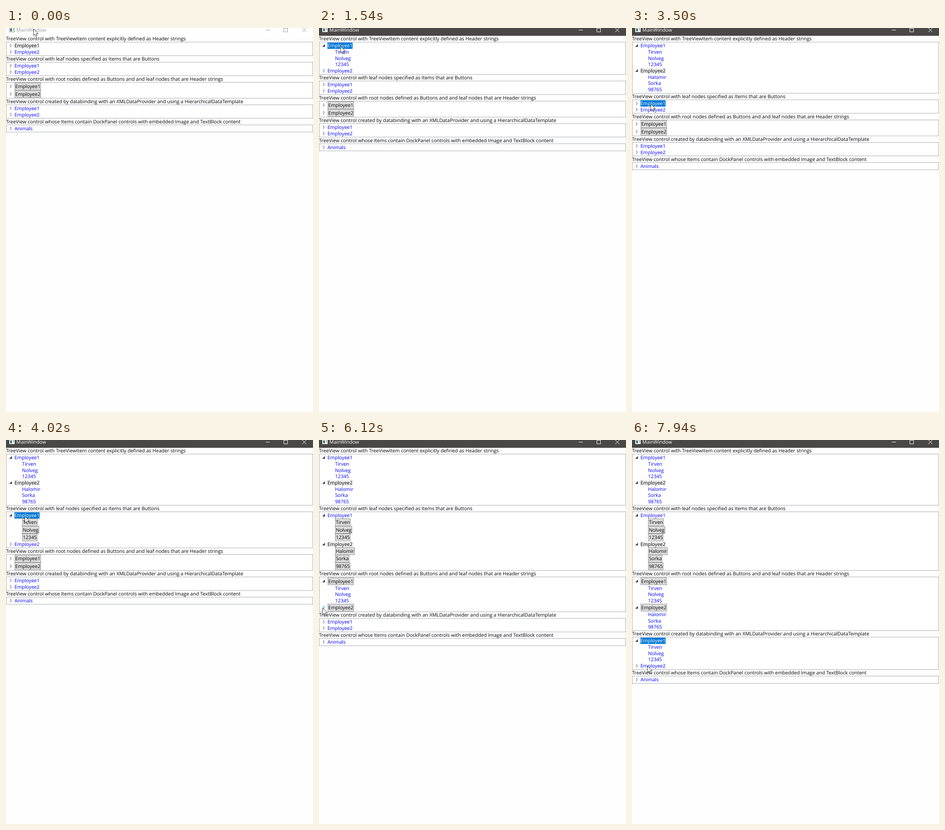
These frames come from a looping animation (669x837 px, 8000 ms). An HTML page:

```html
<!DOCTYPE html>
<html lang="en">
<head>
<meta charset="utf-8">
<title>Tree views</title>
<style>
  html, body { margin: 0; width: 100%; height: 100%; overflow: hidden; background: #fefefe; }
  svg { display: block; width: 669px; height: 837px; }
  text { font: 10.63px "Open Sans", "Noto Sans", sans-serif; white-space: pre; text-rendering: geometricPrecision; }
</style>
</head>
<body>
<svg id="stage" viewBox="0 0 669 837">
  <g id="windowLayer"></g>
  <path id="pointer" d="M0 0V14.6L3.4 11.5 5.7 16.7 7.9 15.7 5.7 10.6H10.3Z" fill="#fff" stroke="#222" stroke-width=".9"/>
</svg>
<script>
const LOOP = 8000, TICK = 143, WAKE = 80, DEPART = 360;
const TOP = 16.8, ROW = 13.67, LINE = .68;
const PAD = 2 * LINE, BUTTON_ROW = ROW + 4 * LINE;
const ROOT_X = 18.6, LEAF_X = 35;
const BLUE = '#0000ff', BLACK = '#000';

const employees = [
  { name: 'Employee1', leaves: ['Tirven', 'Nolveg', '12345'] },
  { name: 'Employee2', leaves: ['Halomir', 'Sorka', '98765'] }
];

const trees = [
  { title: 'TreeView control with TreeViewItem content explicitly defined as Header strings', roots: employees },
  { title: 'TreeView control with leaf nodes specified as Items that are Buttons', roots: employees, leafButtons: true },
  { title: 'TreeView control with root nodes defined as Buttons and and leaf nodes that are Header strings',
    roots: employees, rootButtons: true },
  { title: 'TreeView control created by databinding with an XMLDataProvider and using a HierarchicalDataTemplate',
    roots: employees },
  { title: 'TreeView control whose Items contain DockPanel controls with embedded Image and TextBlock content',
    roots: [{ name: 'Animals', leaves: [] }] }
];

// The pointer visits the employees from top to bottom, two in each tree.
const visits = [
  { x: 47, select: 1270, open: 1540 },
  { x: 41, select: 2420, open: 2720 },
  { x: 41, select: 3360, open: 3750 },
  { x: 47, select: 4490, open: 4640 },
  { x: 9, select: 5450, open: 5450 },
  { x: 8, select: 5990, open: 6270 },
  { x: 34, select: 7010, open: 7280 },
  { x: 34, select: 7990, open: LOOP }
];

const layer = document.getElementById('windowLayer');
const pointer = document.getElementById('pointer');
const pen = document.createElement('canvas').getContext('2d');
pen.font = '10.63px "Open Sans", "Noto Sans", sans-serif';

const textWidth = s => pen.measureText(s).width;
const label = (s, x, mid, fill) => `<text x="${x}" y="${(mid + 3.8).toFixed(2)}" fill="${fill}">${s}</text>`;
const rect = (x, y, w, h, fill, stroke = 'none', weight = 1) =>
  `<rect x="${x}" y="${y}" width="${w}" height="${h}" fill="${fill}" stroke="${stroke}" stroke-width="${weight}"/>`;
const path = (d, fill, stroke) => `<path d="${d}" fill="${fill}" stroke="${stroke}"/>`;

function button(s, x, mid) {
  const height = BUTTON_ROW - LINE;
  return rect(x + .6, mid - height / 2, textWidth(s) + 3 * LINE, height, '#dddddd', '#707070', LINE) +
    label(s, x + 1.7, mid, BLACK);
}

function arrow(mid, open, hover) {
  if (open) return path(`M13 ${mid - 3.6}V${mid + 2.4}H7Z`, '#404040', 'none');
  const d = `M9.4 ${mid - 3.8}L13 ${mid - .2} 9.4 ${mid + 3.4}Z`;
  return hover ? path(d, '#cceefb', '#27c7f7') : path(d, '#fff', '#8c8c8c');
}

function rootLabel(s, mid, state) {
  const back = { focus: '#0078d7', idle: '#f0f0f0' }[state];
  const ink = { focus: '#fff', idle: BLACK }[state] || BLUE;
  const mark = back ? rect(ROOT_X - .3, mid - ROW / 2, textWidth(s) + .3, ROW, back) : '';
  return mark + label(s, ROOT_X, mid, ink);
}

function titleBar(active) {
  const ink = active ? '#fff' : '#999';
  return rect(0, 0, 669, 17, active ? '#4a4846' : '#fff') +
    rect(7.5, -.5, 11, 9, '#fff', active ? '#d8d8d8' : '#8a8a8a') +
    rect(9, 1, 4, 6, '#2f7f70') + rect(15, 1, 2, 2, '#777') + rect(15, 4, 2, 2, '#aaa') +
    label('MainWindow', 22.6, 4.2, ink) +
    path('M566 4.5H575M605.5 .5H613.5V8.5H605.5ZM645.5 0L654.5 9M654.5 0L645.5 9', 'none', ink);
}

// Stacks all trees and returns the middle of every visible row.
function layout(t) {
  let y = TOP;
  const place = height => (y += height) - height / 2;
  return trees.map((tree, i) => {
    const titleMid = place(ROW), boxTop = y;
    y += PAD;
    const rows = tree.roots.map(({ name, leaves }, j) => {
      const visit = visits[2 * i + j];
      const open = Boolean(visit) && t >= visit.open;
      const mid = place(tree.rootButtons ? BUTTON_ROW : ROW);
      const shown = open ? leaves : [];
      return { name, mid, open, leaves: shown.map(s => ({ s, mid: place(tree.leafButtons ? BUTTON_ROW : ROW) })) };
    });
    y += PAD;
    return { tree, titleMid, boxTop, rows, bottom: y };
  });
}

// Glides from one visited row to the next, refreshed once per tick.
function pointerAt(time, views) {
  if (time < WAKE) return { x: 60, y: 2 };
  const t = time < DEPART ? WAKE : time - (time - DEPART) % TICK;
  const stop = i => i < 0 ? { x: 150, y: 191 } : { x: visits[i].x, y: views[i >> 1].rows[i & 1].mid + 1 };
  const leave = i => i < 0 ? DEPART - TICK : visits[i].open + TICK;
  const last = visits.findLastIndex((v, i) => t >= leave(i));
  const next = last + 1;
  if (next === visits.length) return stop(last);
  const from = stop(last), to = stop(next), begin = leave(last);
  const k = Math.max(0, Math.min(1, (t - begin) / (visits[next].select - begin)));
  const ease = (1 - Math.cos(Math.PI * k)) / 2;
  return { x: from.x + (to.x - from.x) * ease, y: from.y + (to.y - from.y) * ease };
}

function paintTree({ tree, titleMid, boxTop, rows, bottom }, index, current, tip) {
  let svg = label(tree.title, 0, titleMid, BLACK) +
    rect(LINE / 2, boxTop + LINE / 2, 669 - LINE, bottom - boxTop - LINE, '#fff', '#828790', LINE);
  // Each tree keeps its latest choice; only the newest one has the focus.
  const latest = Math.min(Math.max(current, 0), 2 * index + 1);
  rows.forEach((row, j) => {
    const chosen = latest === 2 * index + j;
    const state = chosen ? (latest === current ? 'focus' : 'idle') : '';
    const hover = Math.abs(tip.x - 10) < 5 && Math.abs(tip.y - row.mid) < 7;
    svg += arrow(row.mid, row.open, hover);
    svg += tree.rootButtons ? button(row.name, ROOT_X, row.mid) : rootLabel(row.name, row.mid, state);
    for (const leaf of row.leaves)
      svg += tree.leafButtons ? button(leaf.s, LEAF_X, leaf.mid) : label(leaf.s, LEAF_X, leaf.mid, BLUE);
  });
  return svg;
}

let shown = '';
function draw(t) {
  const views = layout(t), tip = pointerAt(t, views);
  const current = visits.findLastIndex(v => t >= v.select);
  const svg = titleBar(current >= 0) + views.map((v, i) => paintTree(v, i, current, tip)).join('');
  if (svg !== shown) layer.innerHTML = shown = svg;
  pointer.setAttribute('transform', `translate(${tip.x.toFixed(2)} ${tip.y.toFixed(2)})`);
}

const start = performance.now();
function loop() {
  draw((performance.now() - start) % LOOP);
  requestAnimationFrame(loop);
}
loop();
</script>
</body>
</html>
```
